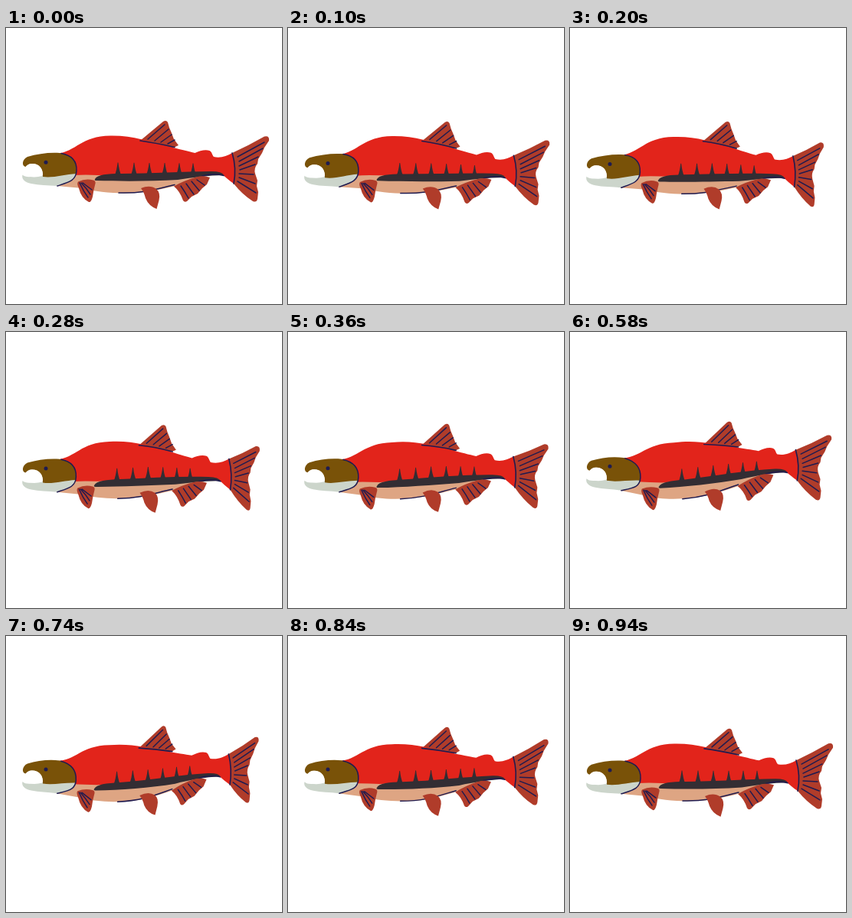
These frames come from a looping animation (360 by 360 pixels, 960 ms). An HTML page with a canvas:

```html
<!DOCTYPE html>
<html lang="en">
<head>
<meta charset="utf-8">
<title>Swimming fish</title>
<style>
  html, body { margin: 0; width: 100%; height: 100%; overflow: hidden; background: #fff; }
  canvas { display: block; width: 360px; height: 360px; }
</style>
</head>
<body>
<canvas id="stage"></canvas>
<script>
const SIZE = 360, LOOP = 960, STEP = 20;
const RED = '#e2241b', FIN = '#b03c2a', TAN = '#dea583', DARK = '#332d33',
      BROWN = '#795208', JAW = '#ccd5cb', NAVY = '#1f1b50';

const canvas = document.getElementById('stage');
const ctx = canvas.getContext('2d');
const ratio = window.devicePixelRatio || 1;
canvas.width = canvas.height = SIZE * ratio;

// Sway along the body: x, sine part of y, cosine part of y, foreshortening in x
const SWAY = [
  [20, 2, -0.5, 0], [60, 1.9, -0.6, 0], [105, -0.4, -2.8, 1],
  [140, 0, -2, 1.4], [195, 1.3, 1.2, 2], [240, 4.7, 2.6, 4.4],
  [295, 6.5, 3, 4.8], [326, 8, 1.2, 10.3], [342, 9.2, 0.6, 14]
];

function swayAt(x) {
  let i = 1;
  while (i < SWAY.length - 1 && x > SWAY[i][0]) i++;
  const from = SWAY[i - 1], to = SWAY[i];
  const k = Math.min(1, Math.max(0, (x - from[0]) / (to[0] - from[0])));
  return from.map((v, n) => v + (to[n] - v) * k);
}

function bend(x, y, angle) {
  const [, s, c, d] = swayAt(x);
  return [x - d * Math.sin(angle) ** 4,
          y + s * Math.sin(angle) + c * (Math.cos(angle) - 1)];
}

const METHODS = { M: 'moveTo', L: 'lineTo', Q: 'quadraticCurveTo', C: 'bezierCurveTo', Z: 'closePath' };

// Path data uses absolute M, L, Q, C and Z commands
const parse = data => data.match(/[A-Z][^A-Z]*/g).map(part => ({
  method: METHODS[part[0]],
  points: (part.slice(1).match(/[\d.]+,[\d.]+/g) || []).map(p => p.split(',').map(Number))
}));

const fill = (color, data) => ({ color, path: parse(data) });
const line = (width, data) => ({ color: NAVY, width, path: parse(data) });

const spikes = [146, 167, 187, 207, 226, 244].map((x, i) => {
  const tip = 175.5 + i * 0.2;
  return `M${x - 4.2},192 Q${x - 1.6},186 ${x - 0.4},${tip} L${x + 0.4},${tip}
    Q${x + 1.6},186 ${x + 4.2},192 Z`;
}).join(' ');

const layers = [
  // Dorsal and tail fins
  fill(FIN, 'M175,147 L205,122 Q209,119.5 211,123 L213,130 L216,137 L219,145 L225,153 L216,157 Z'),
  line(1.5, 'M185,145 L207,126 M194,147 L212,132 M202,149 L216,139 M211,151 L220,146'),
  fill(FIN, `M295,163 Q317,153 337,141.5 Q344,140 343,147 L337,156 L334,163 L329,171 L328,177
    Q323,183 325,190 L328,199 L327,206 L329,214 L328,223 Q327,228 322,226 Q308,217 297,203
    Q301,183 295,163 Z`),
  line(1.5, `M302,168 L337,149 M304,174 L335,157 M304,180 L329,168 M305,185 L325,178
    M304,190 L323,191 M304,195 L325,203 M302,200 L326,215`),

  // Body
  fill(TAN, `M66,190 L130,188 L235,188 L262,194 C238,202 208,210 182,214
    C155,217 120,215 100,209 L66,206 Z`),
  fill(RED, `M66,164 C92,161 98,141 136,140.5 C166,140 186,148 212,154.5
    C226,158 238,161 246.5,163 C253,160 260,158 265.5,160 C269,162 268.5,165 271,168
    C280,170 288,167 295,163 Q301,183 297,203 C291,199 287,195 282,191
    C240,193 180,192 120,192 Q104,191 88,192 L70,185 Z`),
  fill(DARK, `M116,197 C119,191 132,190 150,190 C190,190 230,187 268,187
    Q282,187 284,192 C264,192 244,195 224,198 C190,200 150,200 118,199 Q115,199 116,197 Z`),
  fill(DARK, spikes),
  line(1.5, 'M147,215 C180,216 196,210 220,204.5'),
  line(1.5, 'M256,193 C266,190.5 276,190 284,192.5'),
  line(1.6, 'M175,147 Q196,150 220,155.5'),
  line(1.6, 'M295,163 Q301,183 297,203'),

  // Head
  fill(JAW, `M21.5,191.5 C26,196 35,194 46,192 L91,189 C91,199 80,203 67,206
    C54,205 43,205 33,203 C24,201 20,197 21.5,191.5 Z`),
  fill(BROWN, `M25.5,181 C20,180 21,171 28,168 C41,164 57,162 70,163
    C86,165 93,174 91.5,190 C76,191 61,196 48,194 C49,183 43,177 34,177
    C29,177 28,179 25.5,181 Z`),
  fill('#fff', 'M26,181 C30,175 41,176 45,182 C48,187 48.5,191 47,193 C40,195 31,195 25,192 Z'),
  line(1.5, 'M72,163.5 C86,166 92.5,174 92,186 C91.5,199 82,201 67,206'),

  // Lower fins
  fill(FIN, `M94,200.5 Q104,195.5 114,198.5 Q118,199.5 116,205 Q114,212 113,220
    Q111,228 108,227 Q98,222 95,209 Q92,203 94,200.5 Z`),
  line(1.5, 'M96,202 Q101,213 107,221 M98,202 Q105,209 110,217 M100,202 L112,211'),
  fill(FIN, `M176,209 Q188,204 196,210 Q202,215 199.5,225 L196.5,236
    Q186,232 182,222 Q180,214 176,209 Z`),
  fill(FIN, `M219,206.5 Q232,199 248,194.5 Q258,192 266,195 L262,204 L256,209 L250,216
    L242,220 L236,226 Q233,228 231,225 Q227,213 219,206.5 Z`),
  line(1.5, 'M228,206 Q233,213 238,222 M235,203 L245,217 M242,200 L252,212 M249,198 L259,205')
];

function drawLayer({ color, width, path }, angle) {
  ctx.beginPath();
  for (const { method, points } of path) {
    ctx[method](...points.flatMap(([x, y]) => bend(x, y, angle)));
  }
  if (width) {
    ctx.strokeStyle = color;
    ctx.lineWidth = width;
    ctx.stroke();
  } else {
    ctx.fillStyle = color;
    ctx.fill();
  }
}

function drawEye(angle) {
  const [x, y] = bend(52, 175.3, angle);
  ctx.beginPath();
  ctx.arc(x, y, 2.5, 0, Math.PI * 2);
  ctx.fillStyle = NAVY;
  ctx.fill();
}

function draw(time) {
  const angle = Math.floor((time % LOOP) / STEP) * STEP / LOOP * Math.PI * 2;
  ctx.setTransform(ratio, 0, 0, ratio, 0, 0);
  ctx.fillStyle = '#fff';
  ctx.fillRect(0, 0, SIZE, SIZE);
  ctx.lineCap = ctx.lineJoin = 'round';
  layers.forEach(layer => drawLayer(layer, angle));
  drawEye(angle);
}

let start;
function tick(now) {
  start ??= now;
  draw(now - start);
  requestAnimationFrame(tick);
}
draw(0);
requestAnimationFrame(tick);
</script>
</body>
</html>
```
